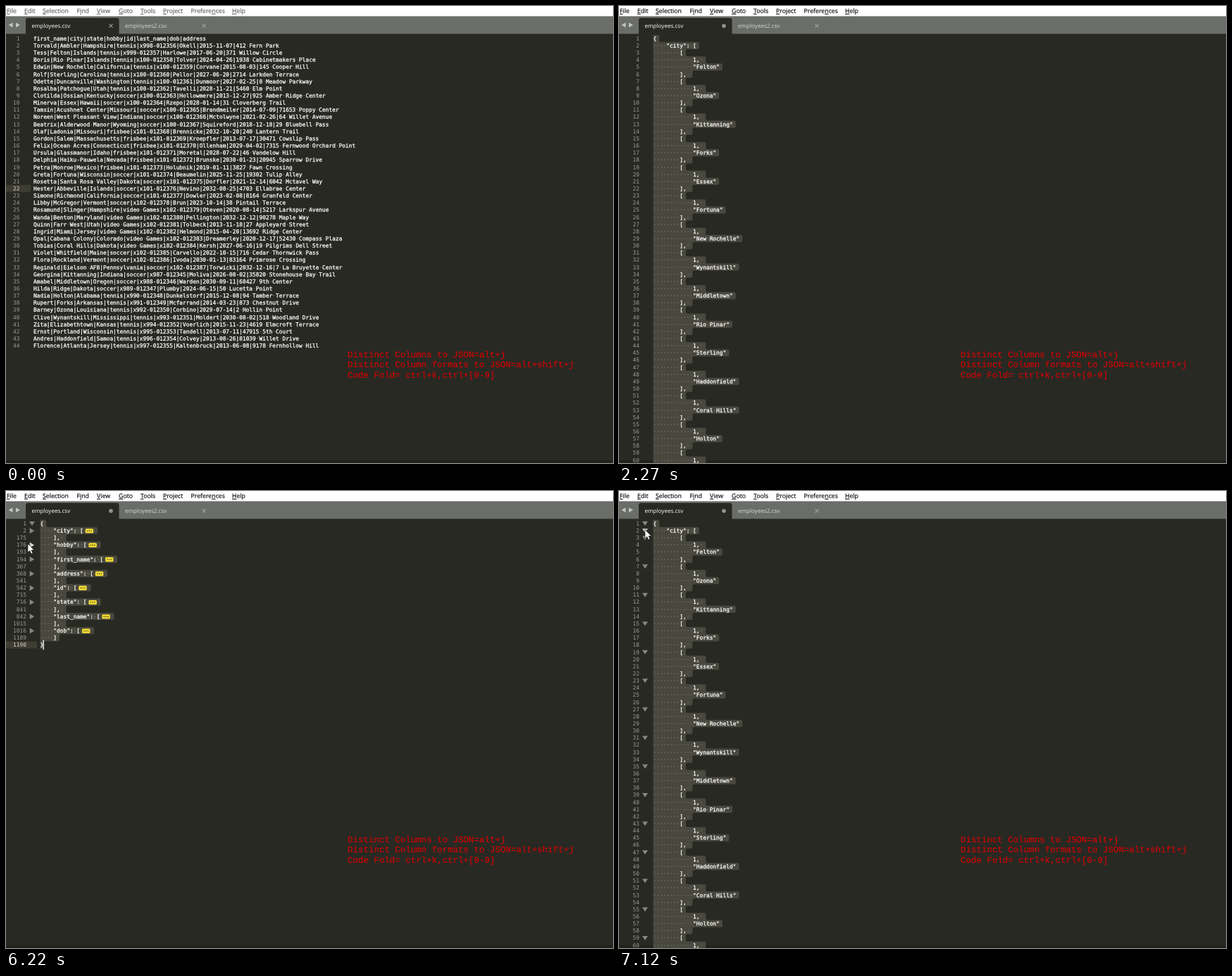
An HTML page for the animation above (8 s loop, 862x649 px).

```html
<!DOCTYPE html>
<html lang="en">
<head>
<meta charset="utf-8">
<title>Columns to JSON</title>
<style>
  html, body { margin: 0; width: 100%; height: 100%; overflow: hidden; background: #282923; }
  svg { display: block; position: absolute; left: 0; top: 0; }
  text { text-rendering: geometricPrecision; }
  .code, .num { font: 7.84px "DejaVu Sans Mono", monospace; fill: #fff; }
  .code { stroke: #fff; stroke-width: .28px; }
  .num { fill: #9a9b95; text-anchor: end; }
  .num.on { fill: #d8d8d0; }
  .dot { fill: #85867c; stroke: none; }
  .ui { font: 8.75px "Open Sans", "Noto Sans", sans-serif; }
  #menu { stroke-width: .15px; }
  .tab { font-size: 8.1px; }
  .u { text-decoration: underline; }
  .note { font: 12.48px "Liberation Mono", monospace; fill: #d40404; stroke: #d40404; stroke-width: .15px; }
  .hide { display: none; }
</style>
</head>
<body>
<svg id="stage" width="862" height="649" viewBox="0 0 862 649"></svg>
<script>
const TOP = 41, ROW = 10.147, CHAR = 4.72, LOOP = 8000;
const CSV_X = 39, JSON_X = 48.5;

// first, city, state, last, born, address
const people = `Torvald|Ambler|Hampshire|Okell|2015-11-07|412 Fern Park
Tess|Felton|Islands|Harlowe|2017-06-20|371 Willow Circle
Boris|Rio Pinar|Islands|Tolver|2024-04-26|1938 Cabinetmakers Place
Edwin|New Rochelle|California|Corvane|2015-08-03|145 Cooper Hill
Rolf|Sterling|Carolina|Pellor|2027-06-20|2714 Larkden Terrace
Odette|Duncanville|Washington|Dunmoor|2027-02-25|8 Meadow Parkway
Rosalba|Patchogue|Utah|Tavelli|2028-11-21|5460 Elm Point
Clotilda|Ossian|Kentucky|Hollowmere|2013-12-27|925 Amber Ridge Center
Minerva|Essex|Hawaii|Rzepo|2028-01-14|31 Cloverberg Trail
Tamsin|Acushnet Center|Missouri|Brandmeiler|2014-07-09|71653 Poppy Center
Noreen|West Pleasant View|Indiana|Mctolwyne|2021-02-26|64 Willet Avenue
Beatrix|Alderwood Manor|Wyoming|Squireford|2018-12-18|29 Bluebell Pass
Olaf|Ladonia|Missouri|Brennicke|2032-10-20|240 Lantern Trail
Gordon|Salem|Massachusetts|Kroepfler|2013-07-17|30471 Cowslip Pass
Felix|Ocean Acres|Connecticut|Ollenham|2029-04-02|7315 Fernwood Orchard Point
Ursula|Glassmanor|Idaho|Moretal|2028-07-22|46 Vandelow Hill
Delphia|Haiku-Pauwela|Nevada|Brunske|2030-01-23|20945 Sparrow Drive
Petra|Monroe|Mexico|Holubnik|2019-01-11|3827 Fawn Crossing
Greta|Fortuna|Wisconsin|Beaumelin|2025-11-25|19302 Tulip Alley
Rosetta|Santa Rosa Valley|Dakota|Dorfler|2021-12-14|6042 Mctavel Way
Hester|Abbeville|Islands|Nevino|2032-08-25|4703 Ellabrae Center
Simone|Richmond|California|Dowler|2023-02-08|8164 Granfeld Center
Libby|McGregor|Vermont|Brun|2023-10-14|38 Pintail Terrace
Rosamund|Slinger|Hampshire|Oteven|2020-08-14|5217 Larkspur Avenue
Wanda|Benton|Maryland|Pellington|2032-12-12|90278 Maple Way
Quinn|Farr West|Utah|Tolbeck|2013-11-18|27 Appleyard Street
Ingrid|Miami|Jersey|Helmond|2015-04-20|13692 Ridge Center
Opal|Cabana Colony|Colorado|Dreamerley|2020-12-17|52430 Compass Plaza
Tobias|Coral Hills|Dakota|Kersh|2027-06-16|19 Pilgrims Dell Street
Violet|Whitfield|Maine|Carvello|2022-10-15|716 Cedar Thornwick Pass
Flora|Rockland|Vermont|Ivoda|2030-01-13|83164 Primrose Crossing
Reginald|Eielson AFB|Pennsylvania|Torwicki|2032-12-16|7 La Bruyette Center
Georgina|Kittanning|Indiana|Moliva|2026-08-02|35820 Stonehouse Bay Trail
Amabel|Middletown|Oregon|Warden|2030-09-11|68427 9th Center
Hilda|Ridge|Dakota|Plumby|2024-06-15|50 Lucetta Point
Nadia|Holton|Alabama|Dunkelstorf|2015-12-08|94 Tamber Terrace
Rupert|Forks|Arkansas|Mcfarrand|2014-03-23|873 Chestnut Drive
Barney|Ozona|Louisiana|Corbino|2029-07-14|2 Hollin Point
Clive|Wynantskill|Mississippi|Moldert|2030-08-02|518 Woodland Drive
Zita|Elizabethtown|Kansas|Voerlich|2015-11-23|4619 Elmcroft Terrace
Ernst|Portland|Wisconsin|Tandell|2013-07-11|47915 5th Court
Andres|Haddonfield|Samoa|Colvey|2013-08-26|81039 Willet Drive
Florence|Atlanta|Jersey|Kaltenbruck|2013-06-08|9178 Fernhollow Hill`.split("\n");

const hobbies = [["tennis", 7], ["soccer", 5], ["frisbee", 6], ["soccer", 5],
  ["video Games", 6], ["soccer", 6], ["tennis", 8]].flatMap(([h, n]) => Array(n).fill(h));

const cities = ["Felton", "Ozona", "Kittanning", "Forks", "Essex", "Fortuna", "New Rochelle",
  "Wynantskill", "Middletown", "Rio Pinar", "Sterling", "Haddonfield", "Coral Hills", "Holton", ""];

const folds = [["city", 2, 175], ["hobby", 176, 193], ["first_name", 194, 367], ["address", 368, 541],
  ["id", 542, 715], ["state", 716, 841], ["last_name", 842, 1015], ["dob", 1016, 1189]];

const rowTop = i => TOP + i * ROW;
const rowMid = i => rowTop(i) + ROW / 2;
const base = i => rowMid(i) + 2.8;
const dots = s => s.replace(/ +/g, m => `<tspan class="dot">${"·".repeat(m.length)}</tspan>`);
const code = (x, i, s) => `<text class="code" x="${x}" y="${base(i)}">${dots(s)}</text>`;
const num = (x, i, n, cls = "") => `<text class="num ${cls}" x="${x}" y="${base(i)}">${n}</text>`;
const rect = (x, y, w, h, fill, more = "") =>
  `<rect x="${x}" y="${y}" width="${w}" height="${h}" fill="${fill}" ${more}/>`;
const caret = (x, i) => rect(x - .7, rowTop(i) - 1.8, 1.4, ROW + 3.6, "#f8f8f0");
const group = (id, body) => `<g id="${id}">${body}</g>`;
const cross = (x, color) =>
  `<path d="M${x - 2.5} 25.7l5 5m0-5l-5 5" stroke="${color}" stroke-width="1.1"/>`;

// Selection outline with rounded steps on its right side
function selection(ends) {
  const r = 2;
  let d = `M${JSON_X} ${TOP}H${ends[0] - r}Q${ends[0]} ${TOP} ${ends[0]} ${TOP + r}`;
  ends.forEach((x, i) => {
    const y = rowTop(i + 1), next = ends[i + 1] ?? JSON_X;
    if (next === x) return;
    const s = Math.sign(next - x) * r;
    d += `V${y - r}Q${x} ${y} ${x + s} ${y}H${next - s}Q${next} ${y} ${next} ${y + r}`;
  });
  return `<path d="${d}V${TOP}Z" fill="#49483e"/>`;
}

function foldMark(i, open) {
  const y = rowMid(i) + .3;
  const d = open ? `M33 ${y - 3}h8l-4 6z` : `M33.7 ${y - 4}v8l6.5-4z`;
  return `<path data-row="${i}" d="${d}" fill="#878880"/>`;
}

function csvScene() {
  const lines = people.map((p, k) => {
    const [first, city, state, last, dob, address] = p.split("|");
    const n = 12345 + (k + 11) % 43;
    const pre = n < 12358 ? n - 11358 : 100 + Math.floor((n - 12358) / 10);
    return [first, city, state, hobbies[k], `x${pre}-0${n}`, last, dob, address].join("|");
  });
  lines.unshift("first_name|city|state|hobby|id|last_name|dob|address");
  const active = (id, i) => group(id, rect(0, rowTop(i), 35, ROW, "#3e3d32") + num(19.4, i, i + 1, "on"));
  return lines.map((s, i) => num(19.4, i, i + 1) + code(CSV_X, i, s)).join("")
    + active("line22", 21)
    + group("line15", active("mark15", 14) + caret(CSV_X + lines[14].length * CHAR, 14));
}

function jsonScene() {
  const pad = n => " ".repeat(n);
  const lines = ["{", pad(4) + '"city": ['];
  cities.forEach(c => lines.push(pad(8) + "[", pad(12) + "1, ", pad(12) + `"${c}"`, pad(8) + "], "));
  lines.length = 60;
  const marks = lines.map((s, i) => /[{[]$/.test(s) ? foldMark(i, true) : "").join("");
  return selection(lines.map(s => JSON_X + s.length * CHAR + 4))
    + lines.map((s, i) => num(28.9, i, i + 1) + code(JSON_X, i, s)).join("")
    + group("jsonMarks", marks);
}

function foldedScene() {
  const rows = [["{", 1]];
  folds.forEach(([key, a, b], k) =>
    rows.push([`    "${key}": [`, a, true], [k < 7 ? "    ], " : "    ]", b]));
  rows.push(["}", 1190]);
  const end = s => JSON_X + s.length * CHAR;
  const badge = (x, i) => rect(x, rowMid(i) - 2.8, 11.5, 6.4, "#f0da35", 'rx="1.5"')
    + [3, 5.75, 8.5].map(o => `<circle cx="${x + o}" cy="${rowMid(i) + .4}" r=".8" fill="#4a4520"/>`).join("");
  const ends = rows.map(([s, n, fold]) => end(s) + (fold ? 20 : n === 1190 ? 0 : 4));
  return rect(0, rowTop(17), 44, ROW, "#3e3d32") + selection(ends)
    + rows.map(([s, n, fold], i) => num(28.9, i, n, n === 1190 ? "on" : "")
      + code(JSON_X, i, s) + (fold ? badge(end(s) + 2.8, i) : "")).join("")
    + caret(53.2, 17)
    + group("foldedMarks", foldMark(0, true) + rows.map((r, i) => r[2] ? foldMark(i, false) : "").join(""));
}

// An underscore precedes each underlined letter
const menu = [["_File", 1], ["_Edit", 26], ["_Selection", 52], ["F_ind", 100.5], ["_View", 129], ["_Goto", 160],
  ["_Tools", 191], ["_Project", 223], ["Prefere_nces", 262.5], ["_Help", 321]]
  .map(([s, x]) => `<text class="ui" x="${x}" y="10">${s.replace(/_(.)/, '<tspan class="u">$1</tspan>')}</text>`).join("");

const notes = ["Distinct Columns to JSON=alt+j", "Distinct Column formats to JSON=alt+shift+j",
  "Code Fold= ctrl+k,ctrl+[0-9]"]
  .map((s, i) => `<text class="note" x="485" y="${498.8 + i * 14.4}">${s}</text>`).join("");

document.getElementById("stage").innerHTML =
  rect(0, 0, 862, 649, "#282923") + rect(0, 645, 862, 4, "#22231d")
  + rect(0, 0, 862, 15, "#fff") + group("menu", menu)
  + rect(0, 14.5, 862, 25, "#6b6d68")
  + '<path d="M28 40V20q0-3 3-3H157.5q3 0 3 3V40z" fill="#282923"/>'
  + '<path d="M9.5 23.5v7l-6-3.5zM14 23.5v7l6-3.5z" fill="#c3c5c0"/>'
  + '<text class="ui tab" x="36.5" y="31" fill="#fff">employees.csv</text>'
  + '<text class="ui tab" x="169" y="31" fill="#cfdcdc">employees2.csv</text>'
  + cross(281, "#a2a49f") + group("clean", cross(149, "#a2a39e"))
  + '<circle id="dirty" cx="149" cy="28.3" r="2.8" fill="#92938d"/>'
  + group("csv", csvScene()) + group("json", jsonScene()) + group("folded", foldedScene()) + notes
  + '<circle id="click" cx="37" cy="56" r="9.8" fill="#d2c400"/>'
  + '<path id="beam" d="M-2.5-5.5H-.8L0-5 .8-5.5H2.5M0-5V5M-2.5 5.5H-.8L0 5 .8 5.5H2.5" fill="none" stroke="#e6e6e2"/>'
  + '<path id="arrow" d="M0 0V12.3L2.8 9.7 4.8 14.2 6.9 13.2 5 8.9H9z" stroke="#111" stroke-width=".6"/>';

const el = {};
document.querySelectorAll("[id]").forEach(e => el[e.id] = e);
const show = (id, on) => el[id].classList.toggle("hide", !on);

// Pointer track: time, x, y, sampling step
const track = [[70, 802, 611, 67.5], [205, 700, 370, 67.5], [340, 624, 192, 2000],
  [5730, 573, 190, 70], [5940, 270, 135, 70], [6080, 95, 96, 70], [6220, 31, 75, 70],
  [6360, 33, 67, 70], [6500, 37, 58, 70], [6570, 50, 58, 70], [6640, 37, 55, 2000]];

function pointer(t) {
  if (t < 70 || (t >= 1870 && t < 5730)) return null;
  const k = track.findLastIndex(p => t >= p[0]);
  const [t0, x, y, step] = track[k], next = track[k + 1];
  if (step > 1000) return [x, y];
  const f = Math.floor((t - t0) / step) * step / (next[0] - t0);
  return [x + (next[1] - x) * f, y + (next[2] - y) * f];
}

function draw(t) {
  const view = t < 2270 ? "csv" : t < 4740 || t >= 7120 ? "json" : "folded";
  ["csv", "json", "folded"].forEach(v => show(v, v === view));
  show("clean", view === "csv");
  show("dirty", view !== "csv");
  show("line22", t < 810);
  show("line15", t >= 810);
  const ink = t < 740 ? "#5c5c5c" : "#000";
  el.menu.setAttribute("fill", ink);
  el.menu.setAttribute("stroke", ink);

  const p = pointer(t), gutter = !!p && p[0] < 46;
  show("arrow", gutter);
  show("beam", !!p && !gutter);
  if (p) el[gutter ? "arrow" : "beam"].setAttribute("transform", `translate(${p})`);

  for (const id of ["jsonMarks", "foldedMarks"]) {
    show(id, gutter);
    if (!gutter) continue;
    const hover = Math.floor((p[1] - TOP) / ROW);
    for (const m of el[id].children)
      m.setAttribute("fill", +m.dataset.row === hover ? "#d0d0c8" : "#878880");
  }

  const down = t >= 6780 && t < 7120;
  show("click", down);
  el.click.setAttribute("opacity", Math.min(.8, .5 + Math.floor((t - 6780) / 90) * .1));
  el.arrow.setAttribute("fill", down ? "#fffbb8" : "#fff");
}

const start = performance.now();
function tick() {
  draw((performance.now() - start) % LOOP);
  requestAnimationFrame(tick);
}
tick();
</script>
</body>
</html>
```
